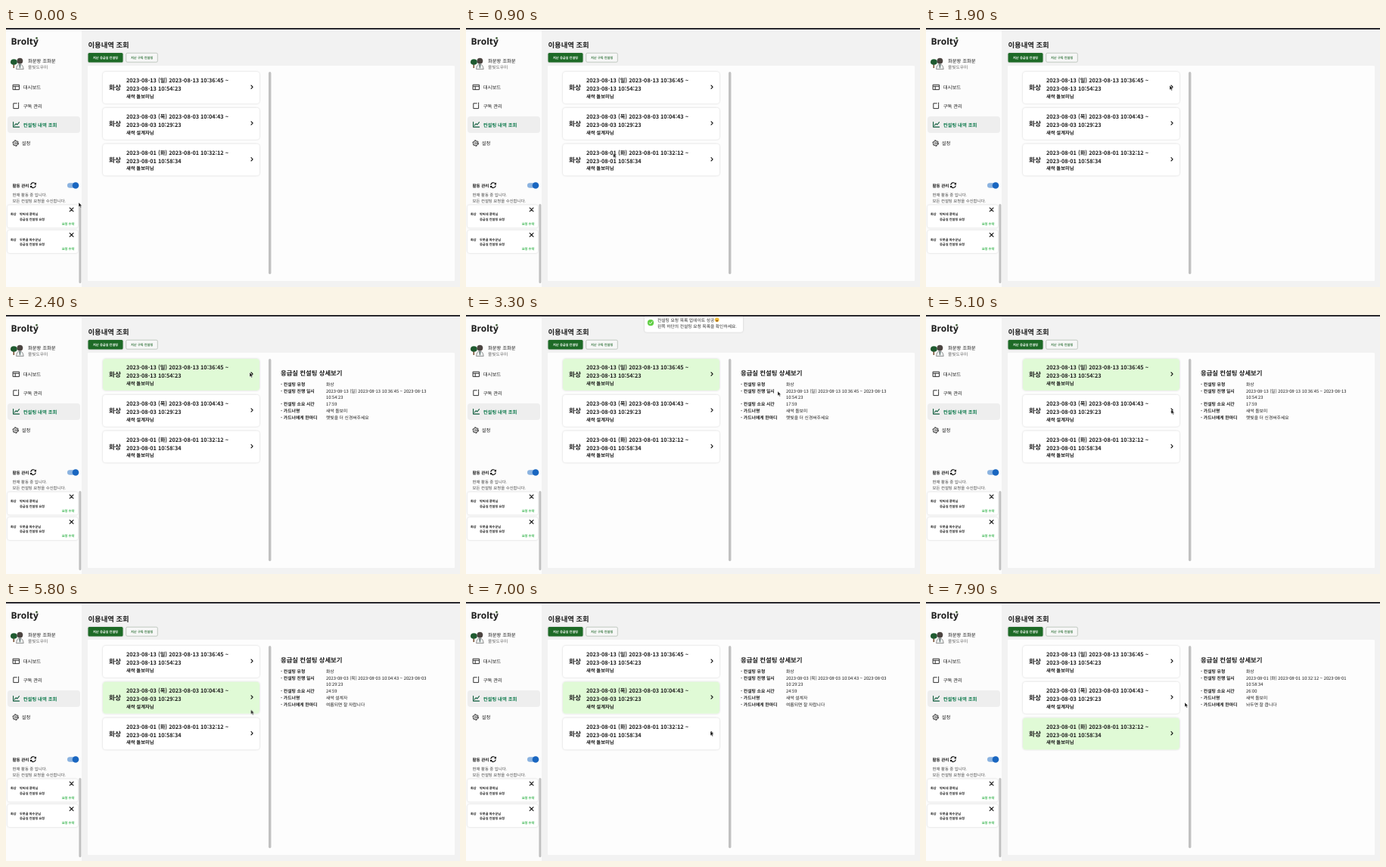
An HTML page for the animation above (8000 ms loop, 600 px wide and 343 px high).

```html
<!DOCTYPE html>
<html lang="ko">
<head>
<meta charset="utf-8">
<title>이용내역 조회</title>
<style>
html, body { margin: 0; width: 100%; height: 100%; overflow: hidden; background: #f2f2f2; }
svg { display: block; width: 100vw; height: 100vh; }
text { font-family: "Noto Sans CJK KR", "Noto Sans KR", "Noto Sans CJK", "Noto Sans CJK JP", sans-serif; fill: #1c1c1c; white-space: pre; text-rendering: geometricPrecision; }
.b { font-weight: 700; }
.m { font-weight: 500; }
.shadow { filter: drop-shadow(0 .6px 1px rgba(0, 0, 0, .18)); }
.line { fill: none; stroke: #333; stroke-width: 1; stroke-linejoin: round; stroke-linecap: round; }
.pick { opacity: 0; animation: 8s step-end infinite; }
.p0 { animation-name: first; }
.p1 { animation-name: second; }
.p2 { animation-name: third; }
#toast { animation: toast 8s infinite; }
#cursor { animation: cursor 8s ease-in-out infinite; }
@keyframes first { 0% { opacity: 0 } 27.5% { opacity: 1 } 65%, 100% { opacity: 0 } }
@keyframes second { 0% { opacity: 0 } 65% { opacity: 1 } 88.75%, 100% { opacity: 0 } }
@keyframes third { 0% { opacity: 0 } 88.75%, 100% { opacity: 1 } }
@keyframes toast {
  0%, 40% { transform: translateY(-38px); animation-timing-function: cubic-bezier(.21, 1.02, .73, 1); }
  43.75%, 58.74% { transform: none; }
  58.75%, 100% { transform: translateY(-38px); }
}
@keyframes cursor {
  0%, 1.25% { transform: translate(96px, 231px); animation-timing-function: ease-in; }
  11.25% { transform: translate(194px, 166px); animation-timing-function: ease-out; }
  17.5% { transform: translate(386px, 92px); }
  22.5%, 33.75% { transform: translate(322px, 76px); }
  40% { transform: translate(416px, 100px); }
  48%, 49% { transform: translate(334px, 118px); }
  53% { transform: translate(348px, 123px); }
  62.5%, 68.75% { transform: translate(324px, 125px); }
  77.5%, 92.5% { transform: translate(323px, 171px); }
  98.75%, 100% { transform: translate(342px, 133px); }
}
</style>
</head>
<body>
<svg viewBox="0 0 600 343" preserveAspectRatio="none">
  <rect width="600" height="343" fill="#f2f2f2"/>
  <rect width="100" height="343" fill="#fcfcfc"/>

  <text x="6.5" y="22" font-size="12" style="font-family:'Noto Sans',sans-serif;font-weight:600">Brolty</text>
  <circle cx="40.5" cy="13.4" r="1.3" fill="#3d5c35"/>

  <g id="avatar">
    <path d="M10.3 46v7" stroke="#7a5236" stroke-width="1.6"/>
    <ellipse cx="10.4" cy="45" rx="4.4" ry="3.8" fill="#1f5a30"/>
    <path d="M13.6 54.5q.2-6.5 4.6-6.5t5 6.5z" fill="#eceeee" stroke="#555" stroke-width=".6"/>
    <path d="M17.4 48.2h2l-.6 5h-.8z" fill="#4e6a66"/>
    <circle cx="18.4" cy="43.6" r="3.9" fill="#4b4440"/>
  </g>

  <rect x="2" y="117" width="96" height="22" rx="4" fill="#eeeeee"/>
  <g class="line">
    <path d="M9.5 75.2h8v6.4h-8zM9.5 77.3h8M12.2 77.3v4.3"/>
    <path d="M14.3 99.8H9.8v6.8h6.8v-4.3M16.6 99v2.4"/>
    <path d="M9.6 124.5v6.6h8M11.2 129l2-2.2 1.6 1.2 2.6-3.2" stroke="#0b5a3a" stroke-width="1.1"/>
    <circle cx="12.7" cy="152.6" r="3.1"/>
    <circle cx="12.7" cy="152.6" r="3.9" stroke-width=".9" stroke-dasharray="2 2.084" stroke-linecap="butt"/>
    <circle cx="12.7" cy="152.6" r="1.1" stroke-width=".8"/>
    <path d="M32.9 207.4a3.1 3.1 0 0 1 5.6-1.3M39.1 209a3.1 3.1 0 0 1-5.6 1.3" stroke="#111" stroke-width="1.2"/>
  </g>
  <path d="M37.1 207.4h2.9v-2.8zM34.9 209h-2.9v2.8z" fill="#111"/>

  <rect x="81" y="205.3" width="14" height="6.4" rx="3.2" fill="#8bb3e0"/>
  <circle cx="92" cy="208.5" r="4.3" fill="#1966c0"/>
  <g id="side"></g>
  <rect x="96.4" y="233" width="3" height="105" rx="1.5" fill="#c1c1c1"/>

  <rect x="108.5" y="33" width="46" height="12.5" rx="1.6" fill="#1d6a26" class="shadow"/>
  <rect x="158.7" y="33.2" width="41.6" height="12" rx="1.6" fill="#f7f7f7" stroke="#a9b5aa" stroke-width=".7"/>
  <rect x="108" y="50" width="485" height="285" rx="1" fill="#fdfdfd"/>
  <rect x="347" y="58" width="3.4" height="268" rx="1.7" fill="#c1c1c1"/>
  <g id="main"></g>

  <g id="toast">
    <rect x="236" y="6.8" width="130" height="25" rx="3.2" fill="#fff" class="shadow"/>
    <circle cx="244" cy="19.2" r="4.1" fill="#5fce43"/>
    <path d="M242.1 19.3l1.4 1.5 2.5-3" class="line" style="stroke:#fff"/>
    <g id="note"></g>
    <circle cx="331.7" cy="15.3" r="2.8" fill="#fbc637"/>
    <path d="M330.1 15.9h3.2q-.2 1.6-1.6 1.6t-1.6-1.6z" fill="#7b3f1d"/>
    <path d="M330.5 14v.8M332.9 14v.8" stroke="#7b3f1d" stroke-width=".6"/>
  </g>
  <rect width="600" height="2" fill="#2b2a30"/>
  <path id="cursor" d="M0 0v6l1.4-1.2 1 2.2 1.1-.5-1-2.1h1.9z" fill="#111" stroke="#fff" stroke-width=".45"/>
</svg>
<script>
const $ = id => document.getElementById(id);

// y is the optical middle of the line
const txt = (x, y, size, str, cls = '', fill = '') =>
  `<text x="${x}" y="${(y + size * 0.41).toFixed(2)}" font-size="${size}" class="${cls}"${fill && ` style="fill:${fill}"`}>${str}</text>`;

const request = (y, name) => `
  <rect x="2" y="${y}" width="93" height="30" rx="3" fill="#fff" class="shadow"/>
  <path d="M84.2 ${y + 3.6}l4.8 4.8m0-4.8l-4.8 4.8" class="line" style="stroke:#111;stroke-width:1.1"/>` +
  txt(6, y + 12, 4.2, '화상', 'b') +
  txt(18, y + 12, 4.2, name, 'b') +
  txt(18, y + 18.5, 4.2, '응급실 컨설팅 요청', 'b') +
  txt(73.7, y + 24.6, 4.2, '요청 수락', 'b', '#35b44c');

$('side').innerHTML =
  txt(29, 43.3, 6.3, '화분왕 조화분', 'm') +
  txt(29, 51.8, 5.7, '풀빛도우미', '', '#666') +
  txt(22.7, 78.5, 6.4, '대시보드', 'm', '#222') +
  txt(22.7, 103, 6.4, '구독 관리', 'm', '#222') +
  txt(22.7, 128, 6.4, '컨설팅 내역 조회', 'b', '#0f7a4d') +
  txt(20.7, 152.7, 6.4, '설정', 'm', '#222') +
  txt(8.5, 208.5, 5.55, '활동 관리', 'b') +
  txt(8.5, 220.3, 5.4, '현재 활동 중 입니다.', '', '#444') +
  txt(8.5, 229, 5.4, '모든 컨설팅 요청을 수신합니다.', '', '#444') +
  request(234.5, '박씨네 콩떡님') +
  request(268, '두붓골 파수꾼님');

const visits = [
  { day: '2023-08-13', dow: '일', from: '10:36:45', to: '10:54:23', took: '17:59', who: '새싹 돌보미', tip: '햇빛을 더 신경써주세요' },
  { day: '2023-08-03', dow: '목', from: '10:04:43', to: '10:29:23', took: '24:59', who: '새싹 설계자', tip: '여름되면 잘 자랍니다' },
  { day: '2023-08-01', dow: '화', from: '10:32:12', to: '10:58:34', took: '26:00', who: '새싹 돌보미', tip: '놔두면 잘 큽니다' }
];
const start = v => `${v.day} (${v.dow}) ${v.day} ${v.from} ~`;

const card = (v, i) => {
  const y = 58 + i * 47.8;
  const box = `x="128" y="${y}" width="207" height="42" rx="4"`;
  return `<rect ${box} fill="#fff" class="shadow"/>
    <rect ${box} fill="#e0fad6" class="pick p${i}"/>
    <path d="M324 ${y + 18}l2.1 2.2-2.1 2.2" class="line" style="stroke:#111;stroke-width:1.1"/>` +
    txt(136, y + 20.9, 8.7, '화상', 'b') +
    txt(159, y + 11.2, 7.3, start(v), 'b') +
    txt(159, y + 22.2, 7.3, `${v.day} ${v.to}`, 'b') +
    txt(159, y + 32.2, 6.3, v.who + '님', 'b');
};

const detail = (v, i) => {
  const rows = [
    [91.3, '컨설팅 유형', '화상'],
    [100.2, '컨설팅 진행 일시', `${start(v)} ${v.day}`],
    [117.8, '컨설팅 소요 시간', v.took],
    [126.6, '가드너명', v.who],
    [135.3, '가드너에게 한마디', v.tip]
  ];
  return `<g class="pick p${i}">` +
    txt(363, 76.7, 8.35, '응급실 컨설팅 상세보기', 'b') +
    rows.map(([y, k, val]) => txt(363, y, 5.85, '- ' + k, 'b') + txt(423, y, 5.8, val)).join('') +
    txt(423, 109, 5.8, v.to) + '</g>';
};

$('main').innerHTML =
  txt(108.5, 21.8, 9.35, '이용내역 조회', 'b') +
  txt(115, 39.1, 4.2, '지난 응급실 컨설팅', 'b', '#fff') +
  txt(165, 39.1, 4.2, '지난 구독 컨설팅', 'b', '#3c7a45') +
  visits.map(card).join('') +
  visits.map(detail).join('');

$('note').innerHTML =
  txt(253, 15.2, 5.75, '컨설팅 요청 목록 업데이트 성공', 'm', '#2c2c2c') +
  txt(253, 23.3, 5.75, '왼쪽 하단의 컨설팅 요청 목록을 확인하세요.', 'm', '#2c2c2c');
</script>
</body>
</html>
```
